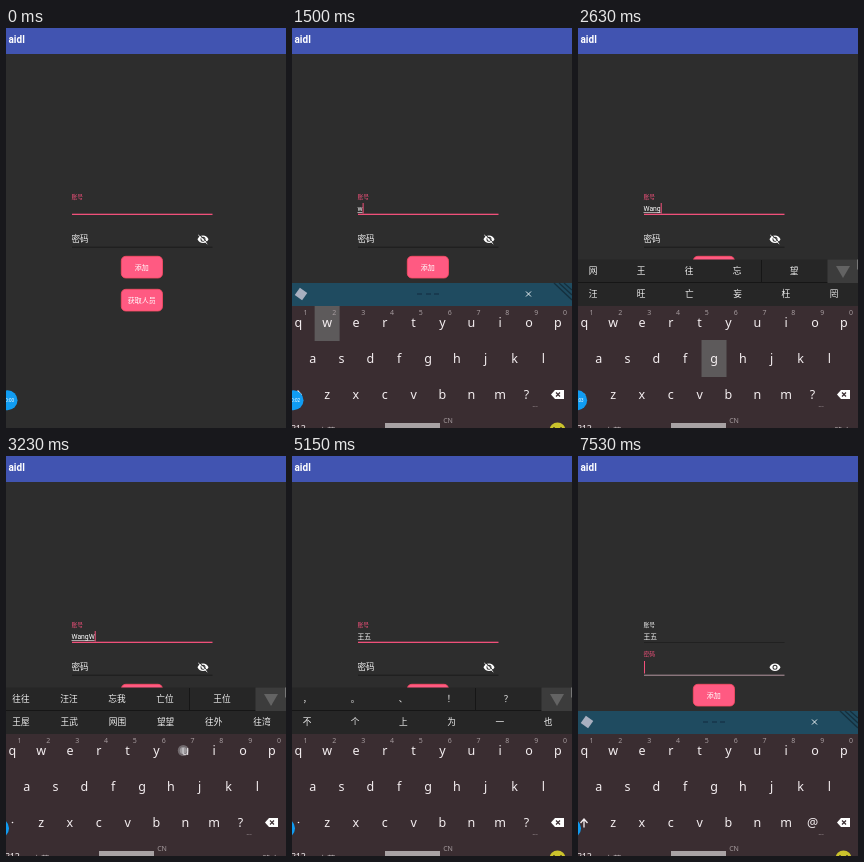
An HTML page for the animation above (8000 ms loop, 280 by 400 pixels).

```html
<!DOCTYPE html>
<html lang="zh">
<head>
<meta charset="utf-8">
<title>aidl</title>
<style>
html, body { margin: 0; width: 100%; height: 100%; overflow: hidden; background: #2d2d2d; }
svg { display: block; width: 100vw; height: 100vh; }
text { fill: #fff; font-family: Roboto, "Noto Sans CJK SC", sans-serif; }
.mid { text-anchor: middle; }
.key { font: 12.5px "Noto Sans", sans-serif; fill: #f4eef0; }
.hint { font: 7px "Noto Sans", sans-serif; fill: #a59b9e; }
.cand { font-size: 8.7px; fill: #f0f0f0; }
.low { font-size: 8.5px; fill: #bdb4b7; }
</style>
</head>
<body>
<svg id="stage" viewBox="0 0 280 400">
  <rect width="280" height="400" fill="#2d2d2d"/>
  <rect width="280" height="26" fill="#4154b1"/>
  <text x="2.5" y="15.4" font-size="10" font-weight="600">aidl</text>

  <text id="userLabel" x="65.5" y="171.2" font-size="5.8">账号</text>
  <text id="value" x="65.5" y="182.8" font-size="6.8"></text>
  <rect id="compose" x="65.5" y="184" height=".7" fill="#ddd"/>
  <rect id="userLine" x="66" width="140.5"/>
  <text id="passLabel" x="65.5">密码</text>
  <rect id="passLine" x="66" y="218.7" width="140.5" height="1"/>
  <rect id="cursor" width="1" fill="#f2507a"/>

  <g transform="translate(191 205.2) scale(.5)">
    <path fill="#fff" fill-rule="evenodd" d="M12 4.5C7 4.5 2.7 7.6 1 12c1.7 4.4 6 7.5 11 7.5s9.3-3.1 11-7.5c-1.7-4.4-6-7.5-11-7.5zM12 17a5 5 0 1 1 0-10 5 5 0 0 1 0 10zm0-8a3 3 0 1 0 0 6 3 3 0 0 0 0-6z"/>
    <g id="slash" stroke-width="2">
      <path d="M4.4 2.4 22 20" stroke="#2d2d2d"/>
      <path d="M2.7 3.7 20.5 21.5" stroke="#fff"/>
    </g>
  </g>

  <g fill="#ff5a82" stroke="#fc4c62" stroke-width=".8">
    <rect x="115.300" y="228.300" width="41.200" height="21.700" rx="4.500"/>
    <rect x="115.300" y="261.300" width="41.200" height="21.700" rx="4.500"/>
  </g>
  <text class="mid" x="135.800" y="241.700" font-size="7">添加</text>
  <text class="mid" x="135.800" y="274.700" font-size="7">获取人员</text>

  <g id="board">
    <rect y="278" width="280" height="130" fill="#3a2d31"/>
    <g id="toolbar">
      <rect y="255" width="280" height="23" fill="#1f4b60"/>
      <rect x="4.500" y="261.500" width="9" height="9" fill="#a9b0c0" transform="rotate(35 9 266)"/>
      <path d="M125 266h5m4 0h5m3 0h5" stroke="#17364a" stroke-width="1.300"/>
      <path d="m234 263.500 5 5m0-5-5 5" stroke="#e6edf0"/>
      <path d="m262 255 18 17m-13-17 13 12m-8-12 8 7" stroke="#15303e" stroke-width="1.300" fill="none"/>
    </g>
    <rect id="press" width="25" fill="#5d5a5b"/>
    <g id="keys"></g>
    <path id="shift" d="M6 371.500v-8m-3.500 3.500L6 363l3.500 4" stroke="#f4eef0" stroke-width="1.300" fill="none"/>
    <circle id="split" cx="6.500" cy="366.500" r=".8" fill="#f4eef0"/>
    <path d="m259 366.500 4-4.500h9v9h-9z" fill="#fff"/>
    <path d="m264 364.500 4 4m0-4-4 4" stroke="#3a2d31" stroke-width="1.200"/>
    <rect x="93" y="395" width="55" height="14" fill="#a8a2a4"/>
    <g id="smile">
      <circle cx="265.500" cy="402.500" r="8" fill="#cbc32c"/>
      <path d="M262 399v2m7-2v2" stroke="#4a4318" stroke-width="1.500"/>
    </g>
  </g>
  <g id="veil">
    <rect x="115" y="260.500" width="42" height="23" rx="4" fill="#5c5859"/>
    <path d="M127 271.500h1.500m6.500 0h1.500m6.500 0h1.500" stroke="#3c3839" stroke-width="1.300"/>
  </g>

  <g id="panel">
    <rect y="231.500" width="280" height="46.500" fill="#262626"/>
    <path d="M0 254.500h280M183.500 232v22" stroke="#161616"/>
    <rect x="249.500" y="231.500" width="30.500" height="23.500" fill="#3c3c3c"/>
    <path d="M279.500 231.500v10" stroke="#777"/>
    <path d="M258 238h14l-7 12z" fill="#636363"/>
    <g id="words"></g>
  </g>

  <g id="bubble">
    <circle cx="1.500" cy="372.300" r="10" fill="#109cf2"/>
    <text id="clock" x="8" y="374" font-size="4.500" text-anchor="end"></text>
  </g>
  <g id="touch" fill="#c4c4c8">
    <circle r="5.500" opacity=".4"/>
    <circle r="3.500" opacity=".5"/>
  </g>
</svg>
<script>
const LOOP = 8000, PINK = [240, 80, 122], WHITE = [240, 240, 240], DARK = [28, 28, 28];
const $ = id => document.getElementById(id);
const set = (el, attrs) => { for (const k in attrs) el.setAttribute(k, attrs[k]); };
const show = (id, on) => $(id).style.display = on ? "" : "none";
const clamp = (t, a, b) => Math.min(1, Math.max(0, (t - a) / (b - a)));
const mix = (a, b, p) => a + (b - a) * p;
const tint = (a, b, p) => `rgb(${a.map((v, i) => Math.round(mix(v, b[i], p)))})`;

function label(parent, x, y, str, cls) {
  const el = document.createElementNS("http://www.w3.org/2000/svg", "text");
  set(el, { x, y, class: "mid " + cls });
  el.textContent = str;
  $(parent).append(el);
  return el;
}

// Keyboard
const spots = {};
[["qwertyuiop", 6.3, 295], ["asdfghjkl", 20.7, 331], ["zxcvbnm", 35.1, 367]].forEach(([row, x0, y]) =>
  [...row].forEach((ch, i) => {
    spots[ch] = [x0 + i * 28.83, y];
    label("keys", spots[ch][0], y + 4.4, ch, "key");
  }));
[..."1234567890"].forEach((n, i) => label("keys", 13.5 + i * 28.83, 286.5, n, "hint"));
const mark = label("keys", 234.5, 371.4, "?", "key");
label("keys", 243, 378.5, "...", "hint");
label("keys", 156, 394.7, "CN", "hint");
label("keys", 4, 403.5, "#?12", "key").style.fontSize = "9px";
[["中英", 35], ["，", 207], ["。", 237]].forEach(([str, x]) => label("keys", x, 405.5, str, "low"));
const enter = label("keys", 265, 405.5, "确定", "low");
enter.id = "enter";

// Candidate slots: five on top, six below
const slots = [15, 63, 111, 159, 216].map(x => label("words", x, 246.4, "", "cand"))
  .concat([0, 1, 2, 3, 4, 5].map(i => label("words", 15 + i * 48.2, 269.4, "", "cand")));

// start time, field text, candidates
const typed = [
  [0, "", ""],
  [1480, "w", "我 无 为 玩 问 外 完 文 万 位 晚"],
  [1960, "Wa", "瓦 挖 娃 洼 哇 佤 蛙 袜 娲 腽 我"],
  [2220, "Wan", "万 完 玩 晚 碗 湾 弯 挽 丸 顽 腕"],
  [2580, "Wang", "网 王 往 忘 望 汪 旺 亡 妄 枉 罔"],
  [2870, "WangW", "往往 汪汪 忘我 亡位 王位 王屋 王武 网围 望望 往外 往湾"],
  [3290, "WangWu", "王五 王武 网屋 王屋 忘物 往屋 望无 旺屋 网 王 往"],
  [4650, "王五", "， 。 、 ！ ？ 不 个 上 为 一 也"]
];

// finger down, finger up, key or point
const taps = [
  [1380, 1480, "w"], [1860, 1960, "a"], [2100, 2220, "n"], [2470, 2580, "g"],
  [2770, 2870, "w"], [3190, 3290, "u"], [4410, 4640, [15, 243]],
  [5880, 6000, [197, 211]], [6440, 6520, [110, 211]]
];
const blinks = [[210, 780], [1250, 3790], [4410, 5150], [5620, 6100], [6530, 7030], [7530, LOOP]];

let step = -1, valueWidth = 0;

function drawText(t) {
  const now = typed.findLastIndex(s => t >= s[0]);
  if (now !== step) {
    step = now;
    $("value").textContent = typed[now][1];
    valueWidth = now ? $("value").getComputedTextLength() : 0;
    const words = typed[now][2].split(" ");
    slots.forEach((el, i) => el.textContent = words[i] || "");
    $("compose").setAttribute("width", valueWidth);
  }
  show("compose", now > 0 && t < 4650);
}

function drawFields(t) {
  const p = clamp(t, 6500, 6680), e = p * p * (3 - 2 * p);
  $("userLabel").style.fill = tint(PINK, WHITE, e);
  set($("userLine"), { y: mix(185.7, 186, e), height: mix(1.3, 0.7, e), fill: tint(PINK, DARK, e) });
  set($("passLabel"), { y: mix(214.3, 200.3, e), "font-size": mix(8.6, 5.8, e) });
  $("passLabel").style.fill = tint(WHITE, PINK, e);
  set($("passLine"), { fill: tint(DARK, [178, 148, 158], e) });
  show("slash", t < 6000);
  const inPass = t >= 6500;
  set($("cursor"), inPass ? { x: 66, y: 205, height: 12.5 }
    : { x: Math.max(66, 65.5 + valueWidth), y: 175, height: 10.5 });
  show("cursor", blinks.some(([a, b]) => t >= a && t < b));
}

function drawBoard(t) {
  const rest = 1 - clamp(t, 210, 610), drop = 140 * rest * rest;
  $("board").setAttribute("transform", `translate(0 ${drop})`);
  show("board", t >= 210);
  show("veil", t < 610 && 255 + drop < 264);
  const panel = t >= 1560 && t < 7000, composing = t >= 1560 && t < 4650;
  show("panel", panel);
  show("toolbar", !panel);
  show("shift", !panel);
  show("split", panel);
  show("smile", !composing);
  show("enter", composing);
  mark.textContent = t < 7000 ? "?" : "@";
}

function drawTouch(t) {
  const tap = taps.find(([a, b]) => t >= a && t < b);
  show("touch", tap);
  if (tap) {
    const [x, y] = spots[tap[2]] || tap[2];
    $("touch").setAttribute("transform", `translate(${x - 2} ${y - 0.5})`);
  }
  const held = taps.find(([a, b, k]) => spots[k] && t >= a + 50 && t < b + 70);
  show("press", held);
  if (held) {
    const [x, y] = spots[held[2]], top = Math.max(278, y - 19);
    set($("press"), { x: x - 12.5, y: top, height: y + 18 - top });
  }
}

function drawBubble(t) {
  const p = clamp(t, 2520, 2840);
  $("bubble").setAttribute("transform", `translate(${-8.5 * p * p * (3 - 2 * p)} 0)`);
  $("clock").textContent = "0:0" + Math.floor(t / 1000 + 0.5);
}

const start = performance.now();
function frame() {
  const t = (performance.now() - start) % LOOP;
  drawText(t);
  drawFields(t);
  drawBoard(t);
  drawTouch(t);
  drawBubble(t);
  requestAnimationFrame(frame);
}
frame();
</script>
</body>
</html>
```
